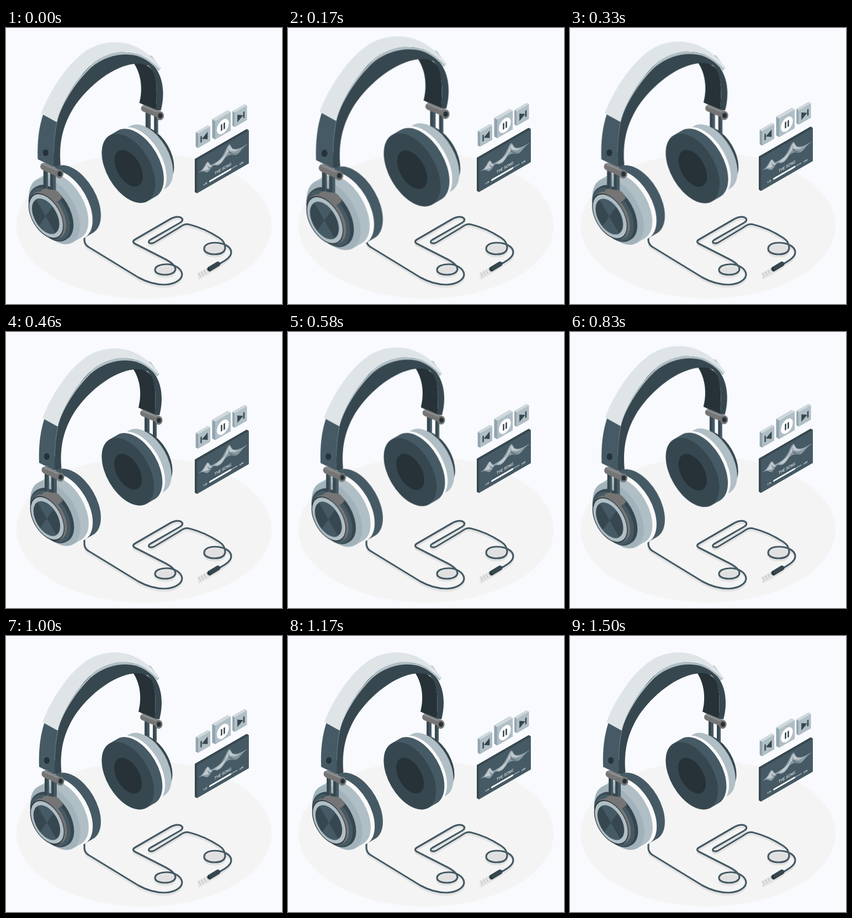
Write an HTML page that moves like this. It is 500 by 500 pixels and loops after 1.54 s.

```html
<!DOCTYPE html>
<html lang="en">
<head>
<meta charset="utf-8">
<title>Headphones</title>
<style>
  html, body { margin: 0; width: 100%; height: 100%; overflow: hidden; background: #f8fafd; }
  svg { display: block; width: 100vw; height: 100vh; }
  text { font-family: Roboto, Inter, sans-serif; fill: #fff; text-anchor: middle; }

  .beat { transform-origin: 172px 208px; animation: beat 1540ms linear -33ms infinite; }
  .float { animation: float 1540ms linear -33ms infinite; }
  @keyframes beat {
    0%, 29.22%, 38.96%, 58.44%, 100% { transform: scale(1); }
    9.74%, 48.7% { transform: scale(1.1); }
  }
  @keyframes float {
    0%, 97.4%, 100% { transform: translateY(0); }
    48.7% { transform: translateY(-10px); }
  }

  .ink { fill: #263238; }
  .dark { fill: #37474f; }
  .slate { fill: #455a64; }
  .mist { fill: #b0bec5; }
  .steel { fill: #757575; }
  .cup path { fill: none; stroke-linecap: round; }
  .cord { fill: none; stroke-width: 3.2; stroke-linecap: round; stroke-linejoin: round; }
</style>
</head>
<body>
<svg viewBox="0 0 500 500">
  <defs>
    <path id="cord" d="M142 374V385Q143 393 150 397L240 452C258 462 273 465 288 465C306 464 319 456 319 446C318 436 306 428 291 428C279 428 270 432 270 438C270 444 278 447 288 447C299 447 307 443 307 436C306 429 297 423 287 418L234 391Q227 387 234 383L296 347C303 343 310 341 316 343C322 346 320 350 315 353L261 384C255 388 261 392 268 389L313 362C320 357 325 354 332 356C353 361 372 371 386 380C394 385 397 391 397 398C397 406 389 410 378 410C367 410 359 406 359 400C359 393 367 389 378 389C394 389 408 396 408 406C408 414 400 420 387 427"/>
    <g id="key">
      <path fill="#90a4ae" d="M0 0l-5-5v-26.5l5 5z"/>
      <path fill="#cfd8dc" d="M0-26.5l-5-5h25.4l5 5z"/>
      <path class="mist" d="M0 0v-26.5h25.4V0z"/>
    </g>
    <g id="skip" class="dark">
      <path d="M5-18.5h2.8v11.5H5zM7.8-12.7L20-19.5v13.500z"/>
    </g>
  </defs>

  <ellipse cx="250" cy="358" rx="231" ry="132" fill="#f4f4f4"/>

  <!-- cord and plug -->
  <g fill="#e0e0e0">
    <ellipse cx="289" cy="440" rx="18" ry="9"/>
    <ellipse cx="378" cy="402" rx="18" ry="10"/>
  </g>
  <use href="#cord" class="cord" stroke="#e2e2e2" y="4"/>
  <use href="#cord" class="cord" stroke="#455a64"/>
  <path d="M386 432L348 453" stroke="#e4e4e4" stroke-width="6"/>
  <path d="M368 437L348 448.500" stroke="#e6e6e6" stroke-width="8"/>
  <path d="M368 437L348 448.500" stroke="#a9b2b6" stroke-width="8" stroke-dasharray="1 4.500" stroke-dashoffset="-3"/>
  <path d="M384 427.500L369 436.500" stroke="#37474f" stroke-width="9" stroke-linecap="round"/>
  <path d="M366 434l4 7" stroke="#263238" stroke-width="2"/>

  <g class="beat">
    <!-- far cup -->
    <g class="cup" transform="matrix(.866 .5 0 1 221 253)">
      <path d="M40-40l9-9" stroke="#37474f" stroke-width="88"/>
      <path d="M40-40l5-5" stroke="#455a64" stroke-width="89"/>
    </g>
    <path class="dark" d="M251 152l9 4v28h-9zM266 158l7 3v36l-7-6z"/>
    <path class="slate" d="M256 154l4 2v28h-4zM270 160l3 1v36l-3-3z"/>
    <g class="cup" transform="matrix(.866 .5 0 1 221 253)">
      <path d="M25-25l14-14" stroke="#b0bec5" stroke-width="104"/>
      <path d="M17-17l5.500-5.500" stroke="#fafafa" stroke-width="110"/>
      <path d="M0 0l17-17" stroke="#455a64" stroke-width="110"/>
      <circle class="dark" r="54.500"/>
      <circle class="ink" r="29"/>
    </g>

    <!-- headband -->
    <path class="dark" d="M88 250V215C90 195 92 180 94 171C102 140 123 101 152 72C180 48 215 43 237 51C263 60 282 85 282 120C282 134 280 143 278 151L269 150C273 120 272 85 256 71L231 68C194 72 150 106 124 145C105 176 97 206 100.500 247L94 251Z"/>
    <path class="ink" d="M231 68C246 66 258 70 264 81C273 98 271 130 269.500 151L240 137C246 115 244 88 231 68Z"/>
    <path class="slate" d="M70 156L94 171C90 190 88 215 88.500 251L60 237C59 205 62 180 70 156Z"/>
    <path d="M94 171C90 190 88.500 210 88.500 225" fill="none" stroke="#78909c" stroke-width=".6"/>
    <ellipse class="ink" cx="74" cy="225.500" rx="5" ry="6"/>
    <path class="mist" d="M93 172C102 142 124 104 154 75C181 52 214 48 236 54C252 59 265 70 274 81L278 76L262 54L180 42L100 130Z"/>
    <path fill="#dfe5e7" d="M66 156C83 112 116 62 152 41C184 24 218 28 240 41C254 48 269 62 277 74L276 78C266 67 252 56 237 50C215 42 180 47 152 71C123 100 102 139 93 171Z"/>

    <!-- far hinge -->
    <path d="M249 147L275 158" stroke="#757575" stroke-width="12" stroke-linecap="round"/>
    <path d="M247 143L274 154" stroke="#8c8f91" stroke-width="3" stroke-linecap="round"/>
    <ellipse class="steel" cx="276.500" cy="160" rx="7" ry="8"/>
    <ellipse class="ink" cx="277" cy="160" rx="4" ry="4.600"/>

    <!-- near cup -->
    <g class="cup" transform="matrix(.866 .5 0 1 74 338)">
      <path d="M41-41l17-17" stroke="#455a64" stroke-width="110"/>
      <path d="M36-36l5-5" stroke="#fafafa" stroke-width="110"/>
      <path d="M18-18l17-17" stroke="#b0bec5" stroke-width="105"/>
      <circle cx="18" cy="-18" r="52" fill="#a2b2ba"/>
      <path d="M9-9l4-4" stroke="#37474f" stroke-width="88"/>
      <circle class="slate" cx="8" cy="-8" r="42"/>
    </g>
    <path class="dark" d="M70 254h8v42h-8zM82 258h10v40h-10z"/>
    <path class="slate" d="M75 256h3v40h-3zM87 260h5v38h-5z"/>
    <path class="steel" d="M66 292Q72 287 78 290L92 292Q99 295 103 306L86 318L62 306Z"/>
    <g class="cup" transform="matrix(.866 .5 0 1 74 338)">
      <circle class="steel" cx="5" cy="-5" r="37"/>
      <circle class="ink" r="36" cx="1" cy="-1"/>
      <circle class="mist" cx="1" cy="-1" r="34.500"/>
      <circle class="dark" r="28"/>
      <g class="slate">
        <path style="fill:#455a64" d="M0 0L-20-20A28 28 0 0 1 14-24Z"/>
        <path style="fill:#455a64" d="M0 0L20 20A28 28 0 0 1-14 24Z"/>
      </g>
    </g>

    <!-- near hinge -->
    <path d="M71 250L97 262" stroke="#757575" stroke-width="13" stroke-linecap="round"/>
    <path d="M70 246L96 257" stroke="#8c8f91" stroke-width="3" stroke-linecap="round"/>
    <ellipse class="steel" cx="98.500" cy="263" rx="7" ry="8"/>
    <ellipse class="ink" cx="99" cy="263" rx="4" ry="4.600"/>
  </g>

  <g class="float">
    <!-- player card -->
    <g transform="matrix(.866 -.5 0 1 346 300)">
      <path class="dark" d="M0 0l-4.600-4.600v-60h108.500l4.600 4.600z"/>
      <path class="slate" d="M0 0v-60h108.500V0z"/>
      <path d="M4-36H105" stroke="#b0bec5" stroke-width=".6"/>
      <path fill="#b0bec5" opacity=".65" d="M5-36C14-36 18-47 22-46C26-45 27-36 33-36C42-36 48-36 54-42C60-47 63-55 67-55C71-55 72-44 77-42C84-38 90-36 104-36C94-35 88-27 82-29C72-32 66-40 60-36C52-28 44-26 38-32C32-37 28-26 22-27C18-28 14-35 5-36Z"/>
      <path fill="#eceff1" opacity=".55" d="M10-36C18-38 20-46 23-45C26-40 29-31 35-33C46-37 55-36 60-43C64-50 67-54 69-52C72-46 78-36 90-36C80-34 74-40 68-42C60-43 55-28 47-30C36-33 30-34 24-32C18-31 16-35 10-36Z"/>
      <path fill="#455a64" opacity=".45" d="M22-40C25-36 28-31 34-31C27-30 22-33 22-40ZM66-50C67-40 76-33 84-31C74-31 63-36 66-50Z"/>
      <text x="54.300" y="-15" font-size="7.400">THE SONG</text>
      <path d="M70-8.500H84" stroke="#90a4ae" stroke-width="2" stroke-linecap="round"/>
      <path d="M27-8.500H70" stroke="#fff" stroke-width="3.200" stroke-linecap="round"/>
      <g font-size="4.200" font-weight="700">
        <text x="17" y="-7">1:24</text>
        <text x="93" y="-6.500">3:50</text>
      </g>
    </g>

    <!-- buttons -->
    <g transform="matrix(.866 -.5 0 1 348 218)">
      <use href="#key"/>
      <use href="#skip"/>
    </g>
    <g transform="matrix(.866 -.5 0 1 379 202.500)">
      <use href="#key" transform="scale(1.28)"/>
      <circle cx="16" cy="-15.500" r="12.500" fill="#fff"/>
      <path class="dark" d="M11.800-21h3v11.500h-3zM17.500-21h3v11.500h-3z"/>
    </g>
    <g transform="matrix(.866 -.5 0 1 414.500 180)">
      <use href="#key"/>
      <use href="#skip" transform="matrix(-1 0 0 1 25.400 0)"/>
    </g>
  </g>
</svg>
</body>
</html>
```
